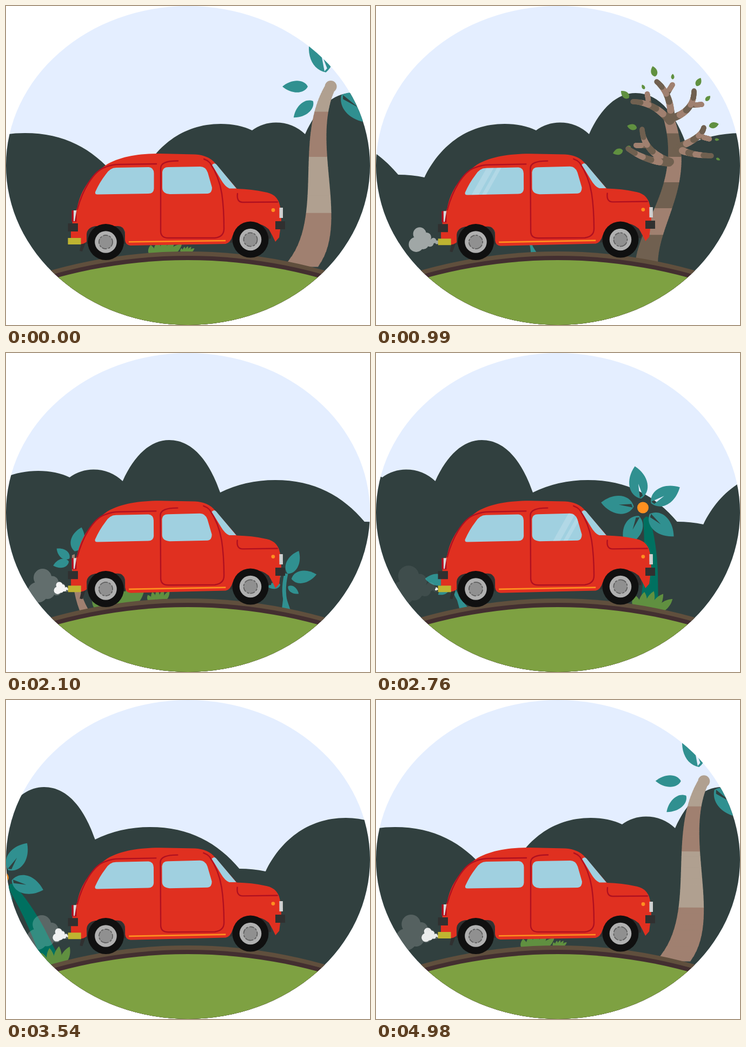
Animation of 673 by 590 pixels, one loop 5010 ms. Source, as an HTML page with a canvas:

```html
<!DOCTYPE html>
<html lang="en">
<head>
<meta charset="utf-8">
<title>Red car drive</title>
<style>
html, body { margin: 0; width: 100%; height: 100%; overflow: hidden; background: #fff; }
canvas { display: block; }
</style>
</head>
<body>
<canvas id="c" width="673" height="590"></canvas>
<script>
const g = document.getElementById('c').getContext('2d');
const LOOP = 5010, STEP = 30, LAST = LOOP - STEP;
const SPIN = 0.000583, BEAT = 1416;
const CX = 336, CY = 1386, R = 932;
const SKY = '#e4eeff', HILL = '#31403f', TEAL = '#309090', GREEN = '#609040',
  STEM = '#007060', BARK = '#706050', LIGHT_BARK = '#a08070', PALM = '#b0a090',
  RED = '#e03020', LINE = '#b01020', GLASS = '#a0d0e0', ORANGE = '#ff9020', DARK = '#303030';

function fill(d, color) { g.fillStyle = color; g.fill(new Path2D(d)); }
function stroke(d, color, w) {
  g.strokeStyle = color; g.lineWidth = w; g.stroke(new Path2D(d));
}
function disc(x, y, r, color) {
  g.fillStyle = color; g.beginPath(); g.arc(x, y, r, 0, 7); g.fill();
}
function box(x, y, w, h, color) { g.fillStyle = color; g.fillRect(x, y, w, h); }
const lerp = (a, b, k) => a + (b - a) * k;
const groundY = x => CY - Math.sqrt(R * R - (x - CX) ** 2);

// Point on a Bezier curve of any degree.
function bezier(pts, k) {
  while (pts.length > 1) {
    pts = pts.slice(1).map((p, i) => [lerp(pts[i][0], p[0], k), lerp(pts[i][1], p[1], k)]);
  }
  return pts[0];
}

// Pointed leaf from base to tip; a slit cuts a wedge open at the base.
function leaf(x1, y1, x2, y2, w, color, slit) {
  const dx = x2 - x1, dy = y2 - y1, n = Math.hypot(dx, dy), px = -dy / n, py = dx / n;
  const p = (a, b) => [x1 + dx * a + px * b, y1 + dy * a + py * b];
  const b = w * 0.72;
  g.beginPath();
  g.moveTo(x1, y1);
  g.bezierCurveTo(...p(0.15, b), ...p(0.65, b), x2, y2);
  g.bezierCurveTo(...p(0.65, -b), ...p(0.15, -b), x1, y1);
  if (slit) {
    g.moveTo(...p(0.03, -2)); g.lineTo(...p(0.46, 0)); g.lineTo(...p(0.08, 4)); g.closePath();
  }
  g.fillStyle = color;
  g.fill('evenodd');
}

// Leaves pointing away from a centre, at angles in degrees.
function whorl(x, y, angles, r0, r1, w, slit) {
  for (const deg of angles) {
    const a = deg * Math.PI / 180, c = Math.cos(a), s = Math.sin(a);
    leaf(x + c * r0, y + s * r0, x + c * r1, y + s * r1, w, TEAL, slit);
  }
}

// Banded trunk along a curve; bands get shorter towards the top.
function trunk(pts, bands, width, colors) {
  const N = 10, total = bands * N;
  const edge = i => {
    const k = 1 - (1 - i / total) ** 1.4, [x, y] = bezier(pts, k);
    return [x, y, width(k) / 2];
  };
  for (let i = 0; i < total; i++) {
    const [x, y, w] = edge(i), [u, v, z] = edge(i + 1);
    fill(`M${x - w} ${y + 0.4}H${x + w}L${u + z} ${v - 0.4}H${u - z}Z`, colors[Math.floor(i / N) % 2]);
  }
}

// Draws scenery that stands in its written place at time t0 and rides round the globe.
function at(t, t0, draw) {
  const a = SPIN * (t0 - t);
  if (Math.abs(a) > 1) return;
  g.save();
  g.translate(CX, CY); g.rotate(a); g.translate(-CX, -CY);
  draw();
  g.restore();
}

const ridge = new Path2D('M200 600V312Q225 312 248.6 317C275 262 325 218 397 218Q430 218 455 230' +
  'Q475 215.5 499 215.5Q530 215.5 553 237C575 188 605 161 639 161C685 161 715 205 733.4 258' +
  'Q780 235 835 235C908 235 960 264 1001 313V600Z');

function hills(t) {
  g.fillStyle = HILL;
  for (let k = -1; k < 2; k++) {
    g.save(); g.translate(800 * (k - t / LAST), 0); g.fill(ridge); g.restore();
  }
}

function palm() {
  trunk([[545, 482], [615, 400], [545, 250], [600, 149]], 4,
    k => lerp(36, 22, k) + 28 * (1 - k) ** 1.5, [LIGHT_BARK, PALM]);
  disc(600.5, 149, 11, PALM);
  whorl(600, 149, [140, 180], 42, 89, 20);
  whorl(598, 149, [256, 310, 36], 27, 113, 40, true);
}

function sprout(size) {
  g.translate(519, 472); g.scale(size, size); g.translate(-519, -472);
  stroke('M521 476C512 450 513 430 518 408', TEAL, 7);
  fill('M514 440L510 474L526 476Z', TEAL);
  whorl(515, 420, [-64, -10], 13, 60, 21);
  whorl(515, 427, [35, 170], 8, 32, 11);
  whorl(515, 418, [207], 8, 48, 20);
}

function sapling() {
  fill('M122 374L127 372Q127 430 153 476L136 476Q120 435 122 374Z', LIGHT_BARK);
  whorl(122, 384, [-74, -28], 18, 64, 23);
  whorl(122, 384, [218, 165], 6, 36, 15);
}

// Fan of blades growing out of the ground, leaning further to the right.
function clump(x, size) {
  for (let i = 0; i < 5; i++) {
    const bx = x + 13 * i * size, by = groundY(bx);
    const h = 24 + 15 * Math.sin(i * Math.PI / 4);
    leaf(bx, by + 9 * size, bx + (11 * i - 4) * size, by - h * size, 19 * size, GREEN);
  }
}

function grass(x, size) {
  clump(x, size);
  clump(x + 92 * size, size * 0.42);
}

function flower() {
  fill('M494 308Q500 298 506 306Q519 350 521 405L522 474L488 470Q500 390 494 308Z', STEM);
  for (let k = 0; k < 5; k++) whorl(493.5, 286, [72 * k - 101], 17, 78, 31, true);
  disc(493.5, 286, 10.5, ORANGE);
  clump(482, 0.72);
}

// Root, bend and tip of each limb, then the side its twig grows on.
const limbs = [
  [545, 212, 548, 165, 519, 140, 1], [546, 208, 588, 195, 588, 157, 1],
  [543, 213, 515, 178, 475, 177, 1], [556, 262, 602, 245, 606, 225, 1],
  [556, 262, 578, 276, 620, 277, 0], [544, 288, 495, 270, 492, 228, -1],
  [542, 290, 500, 288, 466, 264, 0]
];

function branch(pts, r0, bands) {
  for (let i = 0; i <= 60; i++) {
    const k = i / 60, [x, y] = bezier(pts, k);
    disc(x, y, lerp(r0, 4.7, k), Math.floor(k * bands * 0.99) % 2 ? LIGHT_BARK : BARK);
  }
}

// A bud beyond a tip, on the line out from the heart of the crown.
function bud(x, y) {
  const a = Math.atan2(y - 240, x - 545), len = 14 + 6 * Math.sin(x * 7);
  const c = Math.cos(a), s = Math.sin(a);
  leaf(x + c * 10, y + s * 10, x + c * (10 + len), y + s * (10 + len), len * 0.55, GREEN);
}

function tree() {
  trunk([[500, 476], [506, 395], [580, 330], [541, 206]], 6, k => lerp(42, 20, k), [BARK, LIGHT_BARK]);
  for (const [x, y, bx, by, tx, ty, side] of limbs) {
    const pts = [[x, y], [bx, by], [tx, ty]];
    if (side) {
      const p = bezier(pts, 0.6), q = bezier(pts, 0.7);
      const a = Math.atan2(q[1] - p[1], q[0] - p[0]) + side * 1.05;
      const end = [p[0] + 21 * Math.cos(a), p[1] + 21 * Math.sin(a)];
      branch([p, end], 4.7, 2);
      bud(...end);
    }
    branch(pts, 7, 5);
    bud(tx, ty);
  }
}

function scenery(t) {
  at(t, 0, () => grass(270, 0.6));
  at(t, 0, palm);
  at(t, 570, () => sprout(0.66));
  at(t, 990, tree);
  at(t, 2100, sapling);
  at(t, 1530, () => grass(482, 1));
  at(t, 2100, () => sprout(1));
  at(t, 2760, flower);
  at(t, 4988, () => grass(270, 0.6));
  at(t, 4988, palm);
}

function ground() {
  disc(CX, CY, R, '#604f3d');
  disc(CX, CY, R - 8, '#432f30');
  disc(CX, CY, R - 16, '#7ea142');
}

function puff(p) {
  if (p <= 0 || p >= 1) return;
  const w = 94 * p;
  g.fillStyle = `rgba(255,255,255,${Math.min(1, 1.34 * (1 - p))})`;
  g.beginPath();
  for (let i = 0; i < 7; i++) {
    const x = 116 - (0.06 + 0.113 * i) * w, r = (0.06 + 0.031 * i) * w;
    const y = 437 + (i % 2 ? -0.055 : 0.012) * i * w;
    g.moveTo(x + r, y);
    g.arc(x, y, r, 0, 7);
  }
  g.fill();
}

function smoke(t) {
  for (let s = 384; s < LOOP; s += BEAT) {
    puff((t - s) / 1010);
    puff((t - s - 885) / 1010);
  }
}

function wheel(x, y, t) {
  disc(x, y, 33.5, '#101010');
  disc(x, y, 20.3, '#b0b0b0');
  g.save();
  g.translate(x, y); g.rotate(t * 0.02);
  disc(0, 0, 13, '#909090');
  g.strokeStyle = '#606060'; g.lineWidth = 1.8;
  g.setLineDash([9, 2, 4, 3]);
  g.beginPath(); g.arc(0, 0, 12.6, 0, 7); g.stroke();
  g.restore();
}

function glint(t) {
  if (t < 700) return;
  const x = 77 + 0.424 * ((t - 700) % BEAT);
  g.fillStyle = 'rgba(228,238,245,.25)';
  for (const [o, w] of [[-25, 13], [-6, 8]]) {
    fill(`M${x + o} 352h${w}l33 -58h${-w}Z`, g.fillStyle);
  }
}

const rearGlass = 'M165 344Q173 326 184 312Q192 299 204 299L264 298Q273 299 273.5 309V338Q273 347 263 347L170 348.5Q164 349 165 344Z';
const sideGlass = 'M289 307Q290 298 300 298L359 297Q369 297 373 308L381 336Q381 346 373 347L303 348Q289 347 289 336Z';

function car(t) {
  const rock = -0.006 * Math.max(0, Math.min(1, t / 400, (LAST - t) / 400));
  g.save();
  g.translate(336, 400); g.rotate(rock); g.translate(-336, -400);
  fill('M140 436L147 438L141 454L136 453Z', DARK);
  fill('M149 440V420Q152 405 170 404H205Q221 406 221 440Z', DARK);
  fill('M414 438L420 412Q432 397 455 397L490 408V430Z', DARK);
  fill('M120 430V412Q126 385 132 372C138 340 158 312 188 292C214 278 245 273 285 273L350 274.5' +
    'Q374 276 386 290L427 338Q456 339 478 344Q499 347 505 364Q509 376 509 398L505 428L498 436' +
    'Q493 425 486 413Q474 401 452 402Q428 405 419 425Q415 438 406 440L230 443Q221 442 220 433' +
    'V418Q217 407 207 407H165Q150 410 149 422V436Q142 442 131 440Z', RED);
  box(114.5, 429, 24, 12, '#bfb431');
  g.lineCap = 'round';
  stroke('M132 376C141 342 161 305 184 298Q196 293 210 293L278 292', LINE, 2.4);
  stroke('M318 286.5Q286 286 286 300L286 418Q287 429 300 429L386 429Q403 427 403 412Q403 374 399 347' +
    'Q394 315 377 290Q372 285 366 283', LINE, 2.4);
  stroke('M428 347Q426 363 438 363L502 362.5', LINE, 2.4);
  g.lineCap = 'butt';
  stroke('M227 436.2L406 434', ORANGE, 2.6);
  fill(rearGlass, GLASS);
  fill(sideGlass, GLASS);
  fill('M381 294Q385 289 389 293L426 337.5H413Q405 334 398 322Z', GLASS);
  g.save();
  g.clip(new Path2D(rearGlass + sideGlass));
  glint(t);
  g.restore();
  box(121.5, 378, 9, 21, LINE);
  fill('M125 378H130.5L127 398H125Z', '#d8d8d8');
  box(505.5, 373, 6.5, 19, '#d0d0d0');
  box(114.5, 402, 18.5, 15, DARK);
  box(498, 398, 18, 15, DARK);
  disc(494, 377.5, 3.4, ORANGE);
  g.restore();
  wheel(184.5, 436.5, t);
  wheel(452, 432, t);
}

function draw(t) {
  g.clearRect(0, 0, 673, 590);
  g.save();
  g.beginPath();
  g.ellipse(336.5, 295, 336.5, 295, 0, 0, Math.PI * 2);
  g.clip();
  box(0, 0, 673, 590, SKY);
  hills(t);
  scenery(t);
  ground();
  smoke(t);
  car(t);
  g.restore();
}

const begin = performance.now();
function tick() {
  const t = (performance.now() - begin) % LOOP;
  draw(Math.floor(t / STEP) * STEP);
  requestAnimationFrame(tick);
}
tick();
</script>
</body>
</html>
```
